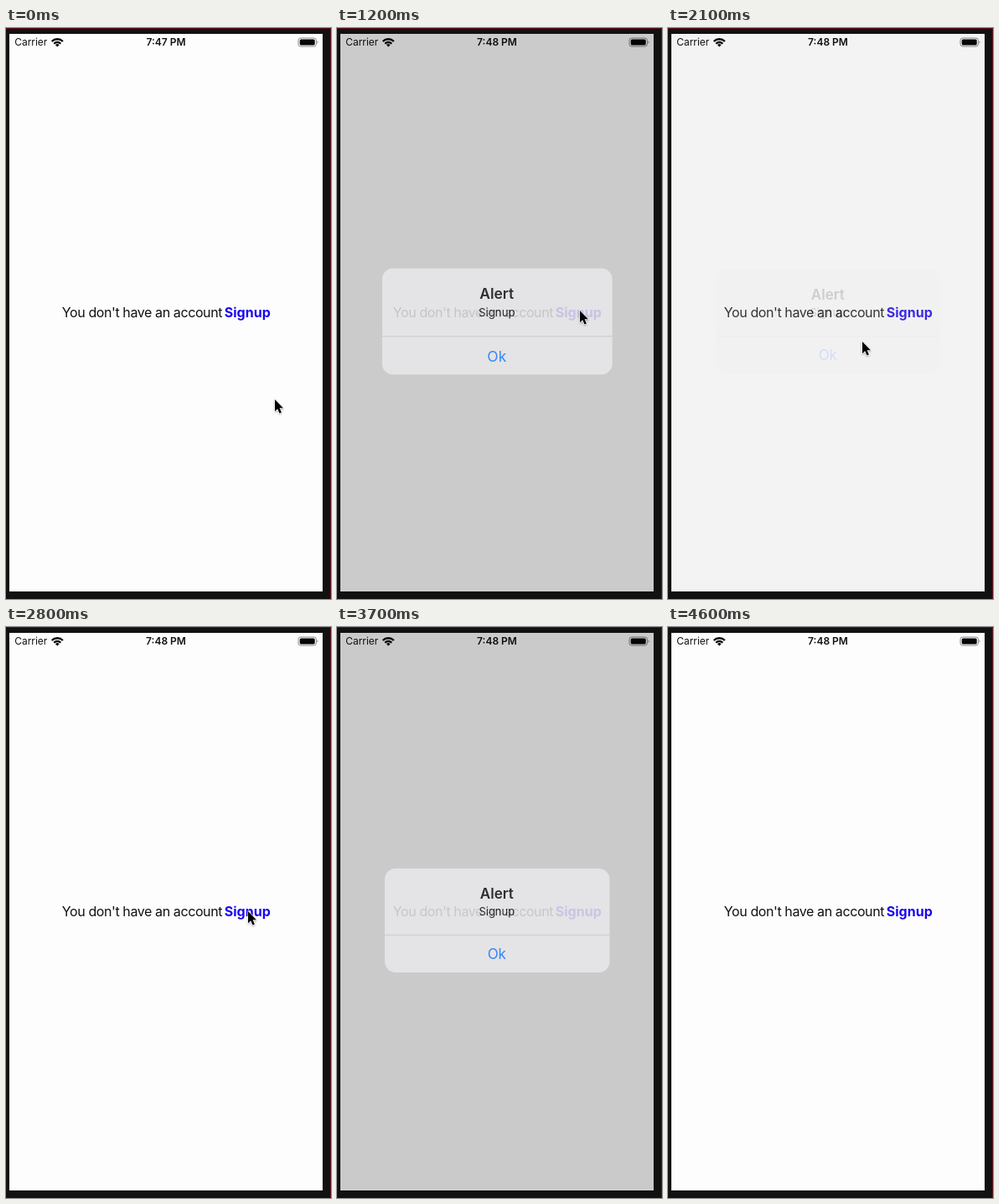
An HTML page for the animation above (5.7 s loop, 388 by 681 pixels).

```html
<!DOCTYPE html>
<html lang="en">
<head>
<meta charset="utf-8">
<title>Signup alert</title>
<style>
  html, body { margin: 0; width: 100%; height: 100%; overflow: hidden; background: #121112; }
  svg { display: block; width: 388px; height: 681px; font-family: Inter, Roboto, sans-serif; }
  .mid { text-anchor: middle; }
  .semi { font-weight: 600; }
</style>
</head>
<body>
<svg viewBox="0 0 388 681">
  <defs>
    <clipPath id="cardClip"><rect x="57" y="288" width="268.5" height="124" rx="13"/></clipPath>
    <filter id="soft" x="-50%" y="-50%" width="200%" height="200%">
      <feDropShadow dx="0" dy="1" stdDeviation="1" flood-opacity=".35"/>
    </filter>
  </defs>

  <rect width="388" height="681" fill="#121112"/>
  <path d="M0 .5H387.5V681" fill="none" stroke="#5c1119"/>
  <rect x="4" y="7" width="374" height="665" fill="#fefdfe"/>

  <g font-size="16" fill="#111">
    <text x="66.8" y="345" letter-spacing="-.4">You don't have an account</text>
    <text x="260.8" y="345" font-weight="700" fill="#1a06ee">Signup</text>
  </g>

  <g id="status" font-size="12" fill="#111">
    <text x="10.3" y="21.4" letter-spacing="-.05">Carrier</text>
    <text id="clock" class="mid semi" x="191" y="21.4"></text>
    <g fill="none" stroke="#080808" stroke-width="2.3">
      <path d="M54.7 16A9.3 9.3 0 0 1 67.9 16"/>
      <path d="M57.3 18.7A5.6 5.6 0 0 1 65.3 18.7"/>
    </g>
    <path d="M61.3 22.6L59 20.3A3.2 3.2 0 0 1 63.6 20.3Z" fill="#080808"/>
    <rect x="349" y="12" width="21.4" height="10" rx="2.8" fill="none" stroke="#8c8b8c"/>
    <rect x="350.7" y="13.6" width="18" height="6.8" rx="1.5" fill="#050505"/>
    <path d="M371.5 15.3Q373.6 17 371.5 18.7Z" fill="#8c8b8c"/>
  </g>

  <rect id="dim" x="4" y="7" width="374" height="665" fill="#040004" fill-opacity=".24"/>

  <g id="alert">
    <g clip-path="url(#cardClip)">
      <rect x="57" y="288" width="269" height="124" fill="#e9e8ea"/>
      <rect id="press" x="57" y="367" width="269" height="45" fill="#d1d3d1"/>
      <rect x="57" y="366.8" width="269" height="1" fill="#cbcbcd"/>
    </g>
    <text class="mid semi" x="190.8" y="323.6" font-size="17" fill="#111">Alert</text>
    <text class="mid" x="190.8" y="343.7" font-size="13" fill="#111">Signup</text>
    <text class="mid" x="190.8" y="396.4" font-size="17" fill="#1c7aff">Ok</text>
  </g>

  <g id="cursor" filter="url(#soft)">
    <path d="M0 0V14.2L3.2 11.2 5.5 16.5 7.9 15.5 5.6 10.3H10Z"
      fill="#050505" stroke="#fff" stroke-width="1.1" stroke-linejoin="round" paint-order="stroke"/>
  </g>
</svg>
<script>
const LOOP = 5700, STEP = 100;
const $ = id => document.getElementById(id);
const [clock, dim, alertBox, press, cursor] = ['clock', 'dim', 'alert', 'press', 'cursor'].map($);

// time, x, y of the pointer tip
const path = [
  [0, 321, 443], [600, 301, 338], [900, 290, 337], [1300, 290, 337],
  [1800, 222, 384], [1900, 222, 383], [2100, 232, 374], [2700, 290, 338],
  [2900, 288, 340], [3200, 249, 380], [3400, 216, 386]
];
// start of fade in, start of fade out
const shows = [[1050, 1950], [2850, 3680]];
const FADE = 250;

const clamp = v => Math.max(0, Math.min(1, v));
const ease = p => p * p * (3 - 2 * p);
const between = (t, a, b) => t >= a && t < b;

function pointer(t) {
  const i = path.findIndex(p => p[0] > t);
  if (i < 0) return path[path.length - 1].slice(1);
  const [t0, x0, y0] = path[i - 1], [t1, x1, y1] = path[i];
  const k = ease((t - t0) / (t1 - t0));
  return [x0 + (x1 - x0) * k, y0 + (y1 - y0) * k];
}

function draw(t) {
  let alpha = 0, scale = 1;
  for (const [start, end] of shows) {
    if (!between(t, start, end + FADE)) continue;
    const rest = (1 - clamp((t - start) / FADE)) ** 2;
    scale = 1 + .15 * rest;
    alpha = t < end ? 1 - rest : (1 - clamp((t - end) / FADE)) ** 2;
  }
  dim.setAttribute('opacity', alpha);
  alertBox.setAttribute('opacity', alpha);
  alertBox.setAttribute('transform',
    `translate(191 350) scale(${scale}) translate(-191 -350)`);

  const down = between(t, 1900, 2000) || between(t, 3600, 3700);
  press.setAttribute('visibility', down ? 'visible' : 'hidden');
  clock.textContent = t < 700 ? '7:47 PM' : '7:48 PM';
  cursor.setAttribute('transform', `translate(${pointer(t)})`);
  cursor.setAttribute('visibility', t < 3700 ? 'visible' : 'hidden');
}

const begin = performance.now();
function tick() {
  const t = (performance.now() - begin) % LOOP;
  draw(Math.floor(t / STEP) * STEP);
  requestAnimationFrame(tick);
}
tick();
</script>
</body>
</html>
```
